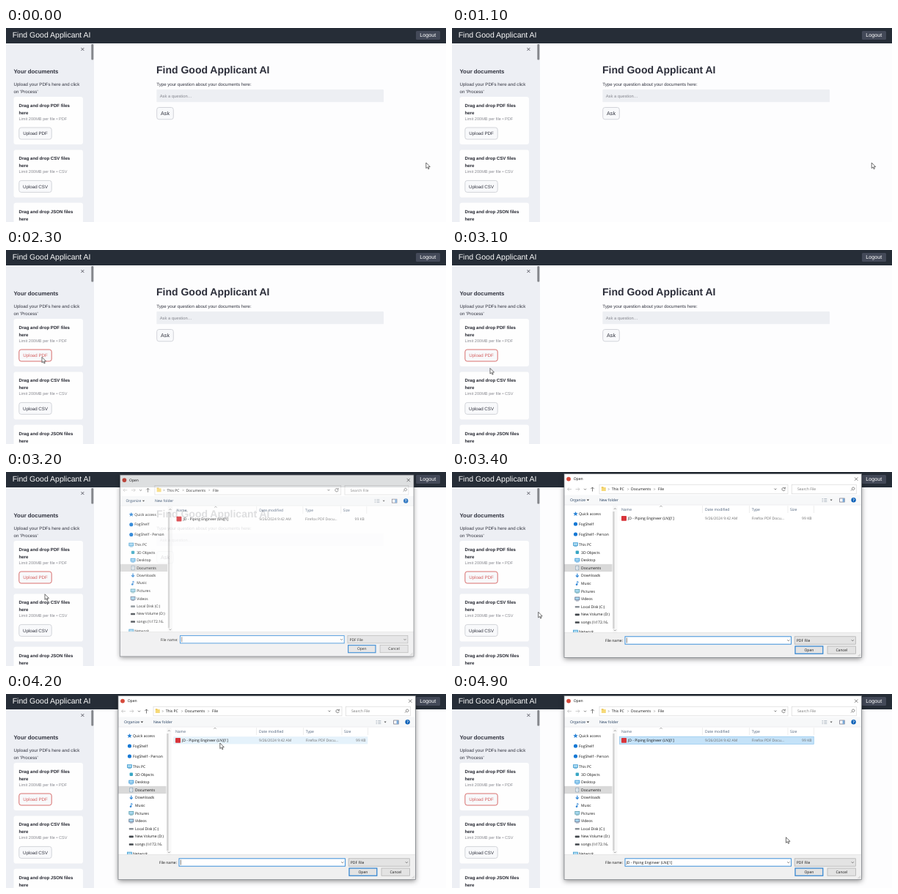
An HTML page that plays this animation: 600x265 px, repeating every 5000 ms.

```html
<!DOCTYPE html>
<html lang="en">
<head>
<meta charset="utf-8">
<style>
  html, body { margin: 0; width: 100%; height: 100%; overflow: hidden; background: #fdfdfe; }
  svg { display: block; width: 600px; height: 265px; text-rendering: geometricPrecision;
        font-family: "Liberation Sans", Arial, sans-serif; white-space: pre; }
  #dialog { font-family: "Open Sans", "Noto Sans", sans-serif; }
  #window { filter: drop-shadow(0 2px 3.5px rgba(0, 0, 0, .45)); }
</style>
</head>
<body>
<svg id="stage" viewBox="0 0 600 265"></svg>
<script>
const APP = 'Find Good Applicant AI';
const LOOP = 5000, STEP = 100;

// Markup helpers
const rect = (x, y, w, h, fill, more = '') =>
  `<rect x="${x}" y="${y}" width="${w}" height="${h}" fill="${fill}" ${more}/>`;
const text = (x, y, size, str, fill = '#31333f', more = '') =>
  `<text x="${x}" y="${y}" font-size="${size}" fill="${fill}" ${more}>${str}</text>`;
const path = (d, stroke, width = 0.7, fill = 'none', more = '') =>
  `<path d="${d}" stroke="${stroke}" stroke-width="${width}" fill="${fill}" ${more}/>`;
const dot = (x, y, r, fill) => `<circle cx="${x}" cy="${y}" r="${r}" fill="${fill}"/>`;
const BOLD = 'font-weight="700"', MID = 'text-anchor="middle"', END = 'text-anchor="end"';
const frame = (color, width = 0.7, r = 0) => `stroke="${color}" stroke-width="${width}" rx="${r}"`;

function uploadCard(y, type) {
  return rect(10.5, y, 94.5, 65, '#fefefe', 'rx="3"') +
    text(17.5, y + 14, 6.1, `Drag and drop ${type} files`, '#22242e', BOLD) +
    text(17.5, y + 23.7, 6.1, 'here', '#22242e', BOLD) +
    text(17.5, y + 32, 5.6, `Limit 200MB per file • ${type}`, '#8a8b92') +
    `<g id="upload${type}" fill="#31333f" stroke="#cfd1d6">` +
    `<rect x="17.8" y="${y + 42}" width="44.4" height="16" rx="3" fill="#f8f9fb" stroke-width=".9"/>` +
    `<text x="40" y="${y + 52.2}" font-size="6.2" stroke="none" ${MID}>Upload ${type}</text></g>`;
}

function page() {
  return rect(0, 0, 600, 265, '#fdfdfe') +
    rect(0, 21, 120, 244, '#edeff4') +
    rect(116.3, 22, 3, 21.5, '#85878c', 'rx="1"') +
    path('M102.4 27l4 4m0-4l-4 4', '#40424c', 0.8) +
    text(10.5, 61.5, 7.8, 'Your documents', '#31333f', BOLD) +
    text(10.5, 79.3, 6.15, 'Upload your PDFs here and click') +
    text(10.5, 89, 6.15, "on 'Process'") +
    uploadCard(94, 'PDF') + uploadCard(166.4, 'CSV') + uploadCard(238.8, 'JSON') +
    text(205, 61.6, 14, APP, '#2c2e3a', BOLD) +
    text(205.3, 79, 6.12, 'Type your question about your documents here:') +
    rect(205.3, 84, 309.7, 17.3, '#edeff3', 'rx="1"') +
    text(209.7, 94.5, 5.8, 'Ask a question…', '#85878f') +
    rect(205.7, 108.5, 22.6, 16.3, '#f8f9fb', frame('#cfd1d6', 0.9, 3)) +
    text(217, 119.2, 7.2, 'Ask', '#31333f', MID) +
    rect(0, 0, 600, 21, '#262d37') +
    text(8.7, 13.4, 10.5, APP, '#fafafa') +
    rect(559, 4, 33, 12, '#434958', 'rx="1.5"') +
    text(575.3, 12.4, 7.2, 'Logout', '#fff', MID);
}

// Navigation entries: label, centre y, icon colour, icon shape
const places = [
  ['Quick access', 57, '#2f86d6', 'star'], ['FogShelf', 71, '#1478d4', 'dot'],
  ['FogShelf - Person', 85, '#1478d4', 'dot'], ['This PC', 99, '#3d9bd0', 'screen'],
  ['3D Objects', 109.7, '#38a6c4'], ['Desktop', 120.4, '#2f93d8', 'screen'],
  ['Documents', 131, '#7d98ad', 'sheet'], ['Downloads', 141.5, '#2f86d6', 'down'],
  ['Music', 152, '#2f86d6', 'note'], ['Pictures', 162.7, '#5b9fae', 'screen'],
  ['Videos', 173.3, '#5d6f8c', 'screen'], ['Local Disk (C:)', 183.8, '#8b9298', 'disk'],
  ['New Volume (D:)', 194.4, '#42474c', 'disk'], ['songs (\\\\172.16.', 205, '#42474c', 'disk'],
  ['Network', 218.4, '#3d9bd0', 'screen']
];

function icon(shape, x, y, c) {
  switch (shape) {
    case 'star': return path(`M${x} ${y - 3}l1 2 2.2.2-1.7 1.5.6 2.2-2.1-1.2-2.1 1.2.6-2.2-1.7-1.5 2.2-.2z`, 'none', 0, c);
    case 'dot': return dot(x, y, 2.6, c);
    case 'screen': return rect(x - 3, y - 2.3, 6, 3.8, '#a9d8f0', frame(c, 0.8)) + path(`M${x - 2} ${y + 2.7}h4`, c);
    case 'sheet': return rect(x - 2, y - 2.8, 4, 5.6, '#fff', frame(c)) + path(`M${x - 1} ${y - 1}h2m-2 1.5h2`, c, 0.5);
    case 'down': return path(`M${x} ${y - 2.8}v4.6m-2-2l2 2 2-2`, c, 1.2);
    case 'note': return path(`M${x} ${y + 1.8}v-4.5l2 1.5`, c, 0.9) + dot(x - 0.8, y + 1.8, 1.3, c);
    case 'disk': return rect(x - 3, y - 0.8, 6, 2.6, c, 'rx=".6"');
    default: return rect(x - 2.2, y - 2.2, 4.4, 4.4, c, 'rx="1"');
  }
}

// Dialog window box
const LEFT = 153, TOP = 2.5, WIDTH = 405.5, HEIGHT = 251;

function dialog() {
  const T = (x, y, str, fill = '#111', more) => text(x, y + 1.8, 5.05, str, fill, more);
  const chevron = (x, y) => path(`M${x} ${y - 1.2}l1.2 1.2-1.2 1.2`, '#666', 0.6);
  const caret = (x, y) => path(`M${x - 1.5} ${y - 0.7}l1.5 1.5 1.5-1.5`, '#444', 0.7);
  const divider = x => path(`M${x} 46v10`, '#e2e2e2', 0.6);
  const button = (x, w, label, stroke, width) =>
    rect(x, 238, w, 10.2, '#e3e3e3', frame(stroke, width)) + T(x + w / 2, 243, label, '#111', MID);

  const nav = places.map(([label, y, color, shape], i) => {
    const child = i > 3 && i < 14;
    return icon(shape, child ? 170.8 : 168.5, y, color) + T(child ? 176 : 173, y, label);
  }).join('');

  return rect(LEFT, TOP, WIDTH, HEIGHT, '#fff', 'id="window"') +
    // Title and address bars
    dot(159, 9.6, 2.9, '#d64a3c') + T(165.7, 9.6, 'Open') +
    path('M549 7.4l4.4 4.4m0-4.4l-4.4 4.4', '#333', 0.6) +
    path('M163 23.5h-5.5m2.2-2.2l-2.2 2.2 2.2 2.2', '#bbb') +
    path('M168.5 23.5h5.5m-2.2-2.2l2.2 2.2-2.2 2.2', '#bbb') +
    caret(181.5, 23.5) + path('M191.5 26.5v-5.6m-2.2 2.2l2.2-2.2 2.2 2.2', '#444') +
    rect(201, 17.2, 257, 12.6, '#fff', frame('#d9d9d9')) +
    rect(203.8, 21, 6, 5, '#f6d978') + rect(203.8, 20.2, 2.8, 1.4, '#e8c050') +
    chevron(213, 23.5) + T(217.7, 23.5, 'This PC') + chevron(239.5, 23.5) +
    T(244, 23.5, 'Documents') + chevron(275.5, 23.5) + T(281, 23.5, 'File') +
    caret(441, 23.3) + path('M453.8 22a2.2 2.2 0 1 0 .5 1.8m.1-3.2v1.9h-1.9', '#555') +
    rect(463.3, 17.2, 88, 12.6, '#fff', frame('#d9d9d9')) + T(471, 23.5, 'Search File', '#777') +
    path('M544 25.5l1.7-1.7a1.8 1.8 0 1 1 .4.4', '#555') +
    // Toolbar
    rect(LEFT, 31.5, WIDTH, 13.5, '#f7f8f9') + path(`M${LEFT} 45h${WIDTH}`, '#e4e5e7', 0.6) +
    T(161, 38.3, 'Organize', '#1e395b') + path('M183.7 37.6h3.4l-1.7 1.8z', 'none', 0, '#333') +
    T(201, 38.3, 'New folder', '#1e395b') +
    path('M504.5 36.5h1.6m-1.6 2h1.6m-1.6 2h1.6m1.2-4h4m-4 2h4m-4 2h4', '#a5b0ba', 0.8) +
    path('M515.6 37.6h3l-1.5 1.8z', 'none', 0, '#555') +
    rect(528.7, 36, 6.5, 5, '#fff', frame('#667')) + rect(532.6, 36, 2.6, 5, '#7aa9d8') +
    dot(547.6, 38.3, 3.2, '#0f62b8') + text(547.6, 40.1, 5, '?', '#fff', BOLD + ' ' + MID) +
    // Navigation pane
    rect(LEFT, 125.8, 65.5, 10.4, '#d9d9d9') +
    `<clipPath id="pane"><path d="M153 45h63.5v174H153z"/></clipPath>` +
    `<g clip-path="url(#pane)">${nav}</g>` +
    rect(219, 46, 6.6, 173, '#f8f8f8') + rect(219.2, 54, 2.4, 160, '#d2d2d2') +
    path('M220.8 51l1.5-1.5 1.5 1.5M220.8 215.5l1.5 1.5 1.5-1.5', '#777') +
    // File list
    T(231, 51, 'Name', '#4c607a') + T(345, 51, 'Date modified', '#4c607a') +
    T(408.7, 51, 'Type', '#4c607a') + T(461, 51, 'Size', '#4c607a') +
    path('M283.3 47.6l1.7-1.5 1.7 1.5', '#777', 0.6) +
    [341.5, 405.5, 458, 493.5].map(divider).join('') +
    `<rect id="row" x="228.3" y="58.2" width="265" height="10.2" stroke-width=".7"/>` +
    rect(231, 60, 7, 6.8, '#d8343a', 'rx=".8"') +
    T(240, 63.3, 'JD - Piping Engineer (LN)[1]') +
    T(345, 63.3, '9/26/2024 9:42 AM', '#6d6d6d') + T(408.7, 63.3, 'Firefox PDF Docu...', '#6d6d6d') +
    T(490.5, 63.3, '99 KB', '#6d6d6d', END) +
    // Footer
    rect(LEFT, 219.5, WIDTH, 34, '#f0f0f0') + path(`M${LEFT} 219.5h${WIDTH}`, '#dcdcdc', 0.6) +
    T(233, 230, 'File name:', '#111', END) +
    rect(236, 224.8, 226.5, 10.4, '#fff', frame('#2a86d8', 0.9)) + caret(458.8, 230) +
    path('M238.3 226.5v7', '#222', 0.6, 'none', 'id="caret"') +
    T(237.5, 230, 'JD - Piping Engineer (LN)[1]', '#111', 'id="fileName"') +
    rect(467.3, 224.8, 83, 10.4, '#e3e3e3', frame('#adadad')) + T(469.8, 230, 'PDF File') + caret(546.3, 230) +
    button(468, 37.8, 'Open', '#2a80d0', 1.2) + button(512, 38.5, 'Cancel', '#adadad', 0.7) +
    path('M553.5 252l3.5-3.5m-1.5 3.5l1.5-1.5', '#aaa', 0.6) +
    rect(LEFT, TOP, WIDTH, HEIGHT, 'none', frame('#70747a', 0.7));
}

const arrow = path('M0 0V7.6L1.8 6 3 8.7 4.2 8.2 3.1 5.6H5.5Z', '#333', 0.7, '#fff');
document.getElementById('stage').innerHTML =
  page() + `<g id="dialog">${dialog()}</g><g id="cursor">${arrow}</g>`;
const el = id => document.getElementById(id);

// Pointer stops: time, x, y
const stops = [
  [0, 572.8, 184], [1200, 572.2, 184], [1800, 67, 134], [2000, 49, 146.3], [2900, 49, 146.3],
  [3200, 53, 166.8], [3400, 117.7, 191.3], [3600, 150, 172], [4000, 291.8, 67],
  [4500, 291.8, 67], [4800, 455.5, 195.7], [LOOP, 455.5, 195.7]
];

function pointer(t) {
  const i = stops.findIndex(s => s[0] > t);
  const [t0, x0, y0] = stops[i - 1], [t1, x1, y1] = stops[i];
  const p = (t - t0) / (t1 - t0), e = p * p * (3 - 2 * p);
  return [x0 + (x1 - x0) * e, y0 + (y1 - y0) * e];
}

function draw(now) {
  const t = Math.floor(now % LOOP / STEP) * STEP;
  const [x, y] = pointer(t);
  el('cursor').setAttribute('transform', `translate(${x} ${y})`);

  const hot = t >= 1900;
  el('uploadPDF').setAttribute('fill', hot ? '#d4605f' : '#31333f');
  el('uploadPDF').setAttribute('stroke', hot ? '#d4605f' : '#cfd1d6');

  const p = Math.min(1, Math.max(0, (t - 3100) / 200)), shown = 1 - (1 - p) ** 2.7;
  const cx = LEFT + WIDTH / 2, cy = TOP + HEIGHT / 2;
  el('dialog').setAttribute('opacity', shown);
  el('dialog').setAttribute('transform',
    `translate(${cx} ${cy}) scale(${0.92 + 0.08 * shown}) translate(${-cx} ${-cy})`);

  const picked = t >= 4400, hover = t >= 4000;
  el('row').setAttribute('fill', picked ? '#c4e2f8' : hover ? '#e5f2fb' : 'none');
  el('row').setAttribute('stroke', picked ? '#8fc6ee' : 'none');
  el('fileName').setAttribute('opacity', picked ? 1 : 0);
  el('caret').setAttribute('opacity', picked ? 0 : 1);
  requestAnimationFrame(tick);
}

const start = performance.now();
const tick = () => draw(performance.now() - start);
tick();
</script>
</body>
</html>
```
